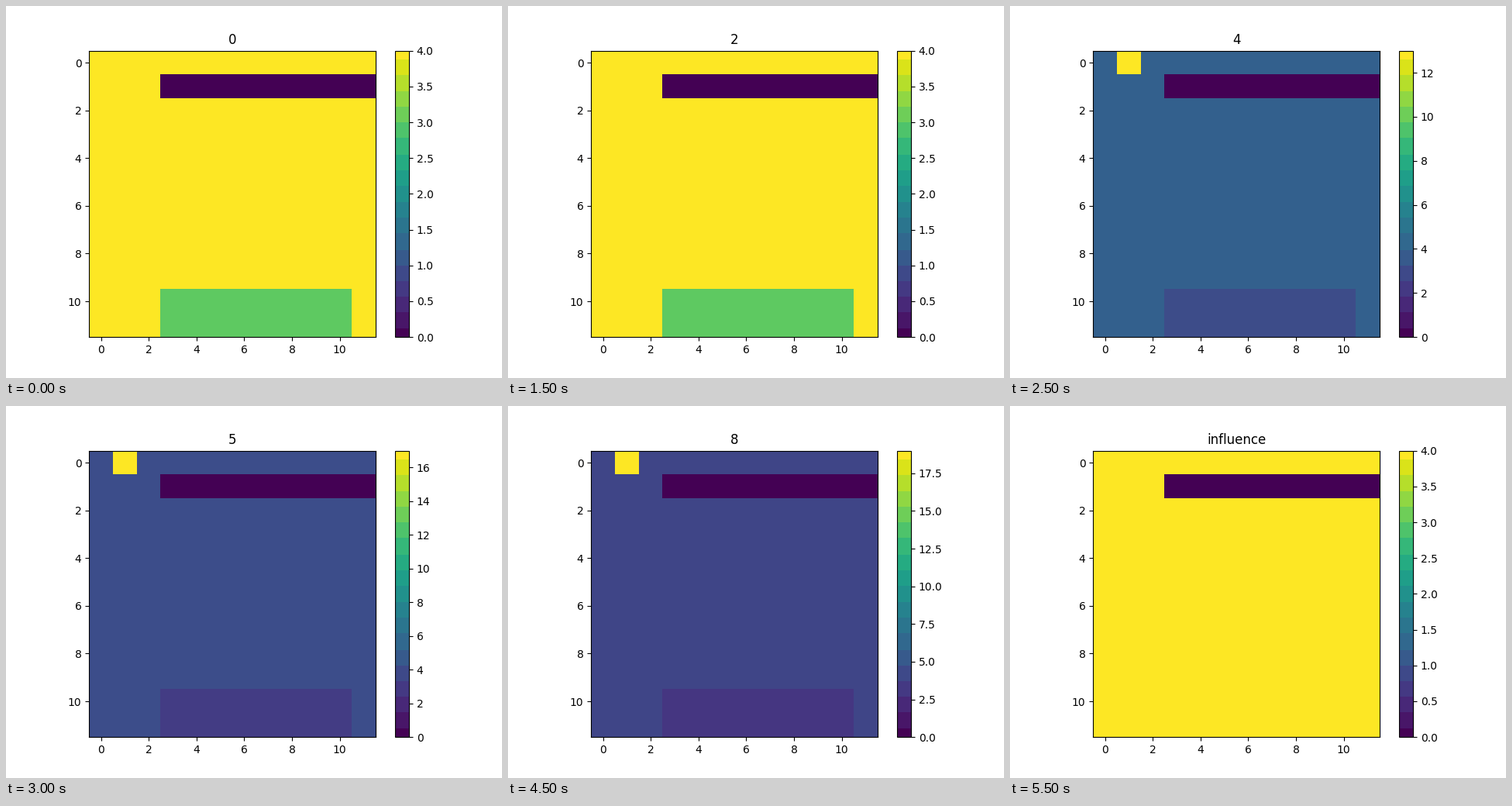
Recreate the animation shown at these times as a matplotlib script. Size 640 by 480 pixels, loop 6000 ms.

```python
import numpy as np
import matplotlib.pyplot as plt
from matplotlib.animation import FuncAnimation
from matplotlib.cm import ScalarMappable
from matplotlib.colors import ListedColormap, Normalize

SIZE = 12           # cells per side
BASE = 4            # value of the plain cells
RUNS = 10           # numbered steps before the closing picture
RISE_FROM = 3       # step at which the one cell starts to grow
BAR_STEPS = 18


def stepped_viridis(steps):
    """Viridis in flat steps, with half steps at both ends."""
    levels = np.round(np.linspace(0, 1, 256) * steps) / steps
    return ListedColormap(plt.get_cmap("viridis")(levels))


def peak_at(step):
    """Value of the growing cell: each gain is half the one before."""
    if step < RISE_FROM or step >= RUNS:
        return BASE
    return min(19, 21 - 16 * 0.5 ** (step - RISE_FROM))


def make_grid(peak, with_block):
    grid = np.full((SIZE, SIZE), float(BASE))
    grid[1, 3:] = 0
    if with_block:
        grid[10:, 3:11] = 3
    grid[0, 1] = peak
    return grid


fig, ax = plt.subplots(figsize=(6.4, 4.8), dpi=100)
image = ax.imshow(make_grid(BASE, True), cmap="viridis", vmin=0, vmax=BASE)
scale = ScalarMappable(Normalize(0, BASE), stepped_viridis(BAR_STEPS))
bar = fig.colorbar(scale, ax=ax)
title = ax.set_title("0")


def update(frame):
    step = max(frame - 1, 0)    # the first picture holds twice as long
    running = step < RUNS
    peak = peak_at(step)
    image.set_data(make_grid(peak, running))
    image.set_clim(0, peak)
    scale.set_clim(0, peak)
    title.set_text(str(step) if running else "influence")
    return image, title


anim = FuncAnimation(fig, update, frames=RUNS + 2, interval=500,
                     repeat=True, repeat_delay=0, blit=False)
plt.show()
```
